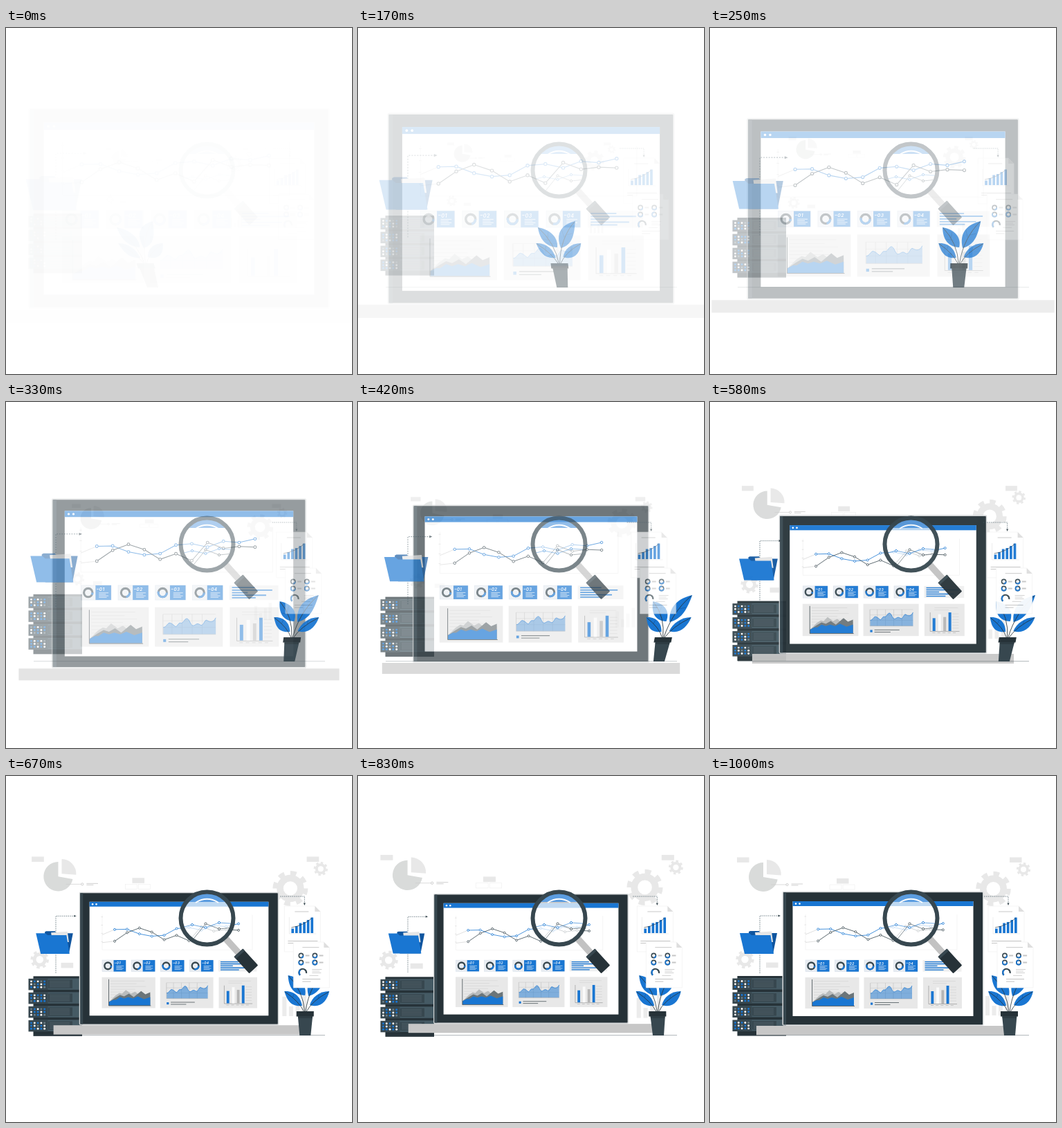
These frames come from a looping animation (500x500 px, 1040 ms). An HTML page:

```html
<!DOCTYPE html>
<html lang="en">
<head>
<meta charset="utf-8">
<title>Data analysis</title>
<style>
html, body { margin: 0; width: 100%; height: 100%; overflow: hidden; background: #fff; }
svg { display: block; width: 100vw; height: 100vh; }
text { font: italic 600 5px Inter, sans-serif; letter-spacing: .4px; }
</style>
</head>
<body>
<svg viewBox="0 0 500 500">
  <clipPath id="glass"><circle cx="290.5" cy="205.5" r="36"/></clipPath>
  <g id="back"></g><g id="server"></g><g id="laptop"></g><g id="floor"></g>
  <g id="folder"></g><g id="lens"></g><g id="plant"></g><g id="docs"></g>
</svg>
<script>
const BLUE = '#1976d2', DARK = '#263238', SLATE = '#37474f', PALE = '#e8e8e8';
const $ = id => document.getElementById(id);
const range = n => [...Array(n).keys()];
const each = (list, draw) => list.map(draw).join('');

const rect = (x, y, w, h, fill, more = '') =>
  `<rect x="${x}" y="${y}" width="${w}" height="${h}" fill="${fill}" ${more}/>`;
const fill = (d, color, more = '') => `<path d="${d}" fill="${color}" ${more}/>`;
const line = (d, color, w = 1, more = '') =>
  `<path d="${d}" fill="none" stroke="${color}" stroke-width="${w}" ${more}/>`;
const dot = (x, y, r, color) => `<circle cx="${x}" cy="${y}" r="${r}" fill="${color}"/>`;
const ring = (x, y, r, color, w, more = '') =>
  `<circle cx="${x}" cy="${y}" r="${r}" fill="none" stroke="${color}" stroke-width="${w}" ${more}/>`;
const rows = (x, y, widths, gap, color, w) =>
  each(widths, (len, i) => line(`M${x} ${y + i * gap}h${len}`, color, w));
const donut = (x, y, r, w, share) => ring(x, y, r, SLATE, w) +
  ring(x, y, r, BLUE, w, `pathLength="100" stroke-dasharray="${share} 100"`);
const gear = (x, y, out) =>
  ring(x, y, out * .59, PALE, out * .38) +
  ring(x, y, out * .87, PALE, out * .28, 'pathLength="16" stroke-dasharray="1 1"');
const series = (points, color) =>
  line('M' + points.join('L'), color, .8) +
  each(points, ([x, y]) => `<circle cx="${x}" cy="${y}" r="1.5" fill="#fff" stroke="${color}" stroke-width=".8"/>`);

function drawBack() {
  return fill('M77 146V125A21 21 0 1 0 97.7 149.6Z', '#d9dbda') +
    fill('M82 142V121A21 21 0 0 1 102.7 143.5Z', PALE) +
    line('M88 157H110', '#ccc', .7) + ring(111.5, 157, 1.6, '#bbb', .7) +
    rows(117.5, 156, [16.5, 10], 2, '#ccc', .9) +
    gear(409.5, 163, 25) + gear(453, 135, 10) + gear(50.5, 265, 13) +
    each([[39, 117.5], [433, 117.5], [183, 148], [81, 269.5]], ([x, y]) => rect(x, y, 17.5, 7.5, PALE)) +
    each([173, 192], x => rect(x, 157, 17, 7, 'none', 'stroke="#eee" stroke-width=".6"')) +
    each([28, 14, 24, 34], (h, i) => rect(398 + i * 9.5, 346 - h, 6, h, '#ececec'));
}

function drawServer() {
  return rect(39.5, 289, 70.5, 86.5, DARK) + each(range(4), u => {
    const y = 292 + u * 20;
    return rect(40, y, 70, 16.5, '#455a64') +
      rect(61, y + 2, 35, 12.5, SLATE) +
      each(range(5), i => line(`M63 ${y + 4 + i * 2.1}h29`, '#5d6e76', .6)) +
      rect(32.5, y + .5, 28, 16.5, SLATE) +
      each(range(15), i => {
        const col = i % 5, row = i / 5 | 0, k = (i * 7 + u * 5) % 11;
        return dot(36.5 + col * 4.8, y + 4.5 + row * 4.2, 1.45, k < 4 ? '#fff' : k < 9 ? BLUE : '#6b7d86');
      });
  });
}

function drawCharts() {
  const area = (d, color, more) => fill('M148 332V' + d + 'V332Z', color, more);
  const bars = [[319.4, 311, BLUE], [327.2, 305.5, '#fafafa'], [334.4, 309.4, '#b5b5b5'], [341.6, 303, BLUE]];
  return rect(137.5, 291, 78, 45, PALE) + rect(222.5, 291, 77.5, 45, PALE) + rect(308, 291, 56, 45, PALE) +
    rows(150, 296.5, [50, 38, 52, 36, 44, 28, 50, 54], 4, '#ccc', .5) +
    area('327L157 318L163 314L167 315L172.5 309.5L180 315L186 312L195 319L208 316', '#b9bcbd') +
    area('327L157 321L164 317L170 319L177 315L184 320L194.8 311L201 316L208 313', '#6b7579') +
    area('327L154 324L158 324L164 320L170 322L176 320L183 322L190 319L199 323L208 320', BLUE) +
    line('M147.6 294V332.5H209', DARK, .7) +
    each(range(3), i => line(`M232 ${299 + i * 7.5}H292`, '#c4c4c4', .5)) +
    each(range(4), i => line(`M${242 + i * 11.5} 299V322`, '#bbb', .5)) +
    fill('M232 322V314C236 314 237 308 240 309S244 312 246 313S249 308 252 309S256 304 259 304S263 312 266 312S270 308 274 311S279 304 282 306S289 309 292 303V322Z', BLUE, 'opacity=".5"') +
    line('M232 314C236 314 237 308 240 309S244 312 246 313S249 308 252 309S256 304 259 304S263 312 266 312S270 308 274 311S279 304 282 306S289 309 292 303', BLUE, .7) +
    line('M231.7 299V322H292', '#999', .4) +
    rect(232, 327.5, 3.2, 3.2, BLUE) + rows(238, 327.5, [35, 22.5], 3, '#5a6468', .9) +
    rows(322, 296.5, [33, 20], 3, '#d2d2d2', .6) +
    each(range(6), i => line(`M347 ${305 + i * 4}h9`, '#c8c8c8', .5)) +
    line('M316 303V329.5H357', '#777', .5) +
    each(bars, ([x, y, color]) => rect(x, y, 3.9, 329 - y, color)) +
    each(range(5), i => line(`M${319 + i * 7.2} 331.5h4`, '#aaa', .6));
}

function drawLaptop() {
  const x = i => +(156.2 + i * 18.06).toFixed(1);
  const blue = [221.4, 221, 227.8, 231.2, 229.8, 220, 218.5, 222.4, 215.7, 217.1, 213];
  const dark = [238.4, 226, 219.2, 225.2, 236.3, 229.9, 237.8, 217.1, 223.8, 221.7, 222.4];
  const plot = (ys, color) => series(ys.map((y, i) => [x(i), y]), color);
  const cards = each(range(4), i => {
    const cx = 138 + i * 42.5;
    return rect(cx, 266, 34.6, 16.7, '#e9edf2', 'stroke="#d0dae6" stroke-width=".5"') +
      donut(cx + 8.3, 274.4, 4.9, 2.4, [8, 22, 55, 30][i]) +
      rect(cx + 16.7, 266, 17.8, 16.7, BLUE) +
      line(`M${cx + 18} 270.3h2.6`, '#fff', .6) +
      `<text x="${cx + 21}" y="272.5" fill="#fff">0${i + 1}</text>` +
      rows(cx + 20.5, 274.6, [11, 8, 11, 9], 1.7, '#d8e7f7', .7);
  });
  return rect(105.2, 167.5, 289.6, 192.5, DARK, 'rx="1.5" stroke="#d5d8d9" stroke-width="1.5"') +
    rect(106, 168.3, 4, 191, SLATE) +
    rect(67, 361, 366, 13.5, '#c7c7c7') +
    rect(119.5, 181, 261, 166, '#fff') + rect(119.5, 181, 261, 7, BLUE) +
    dot(124, 184.6, 1.3, '#fff') + dot(129.5, 184.6, 1.3, '#fff') +
    line('M138 200V251H357V200', '#eee', .6) +
    each(range(4), i => line(`M136.5 ${203 + i * 12}h2.5`, '#ccc', .5)) +
    line('M138 229L156.2 221.4M138 240.5L156.2 238.4', '#ccc', .6) +
    plot(blue, BLUE) + plot(dark, SLATE) + cards +
    rect(307.5, 266, 56, 16.7, '#f0f0f0') +
    rows(310.5, 268.6, [26, 46, 18, 39, 27], 2.9, BLUE, 1.4) +
    drawCharts();
}

function drawFolder() {
  return line('M72 285V202H99', '#455a64', .8, 'stroke-dasharray="1.4 1.4"') +
    fill('M98.5 200.5L102 202L98.5 203.5Z', SLATE) +
    fill('M56 229V225L58 224H71L73 227H97L91 257H60Z', '#0f559f') +
    fill('M65 226L89 224.5L91 240H67Z', '#e6e6e6') +
    fill('M43 227H56.5L60 230H87.5L92 257H50Z', BLUE);
}

function drawLens() {
  return '<circle cx="290.5" cy="205.5" r="37" fill="#fff" opacity=".72"/>' +
    '<g clip-path="url(#glass)">' +
    fill('M254 182V166H327V182Z', '#5c9de0') + fill('M254 166H327V174Q290 166 254 174Z', '#8b9499') +
    line('M274 183Q290.5 172.5 307 183', '#fff', 1.8) +
    line('M240 222.5L269 215L288.5 219L308 212L338 214', BLUE, .8, 'opacity=".75"') +
    line('M246 230L268 239L288.5 213.5L308 221L338 218', SLATE, .8, 'opacity=".75"') + '</g>' +
    each([[269, 215, BLUE], [288.5, 219, BLUE], [308, 212, BLUE], [288.5, 213.5, SLATE], [308, 221, SLATE]],
      ([x, y, color]) => `<circle cx="${x}" cy="${y}" r="1.6" fill="#fff" stroke="${color}" stroke-width=".8"/>`) +
    '<g transform="translate(290.5 205.5) rotate(47.7)">' +
    rect(39, -4.8, 30, 9.6, '#c2c2c2') + rect(67.5, -8.7, 32.5, 17.4, DARK, 'rx="1"') +
    rect(67.5, -8.7, 4, 17.4, SLATE) + '</g>' +
    ring(290.5, 205.5, 38, SLATE, 6);
}

function drawPlant() {
  const leaves = [
    'M462 279C438 285 432 300 437 318C455 314 459 296 462 279Z',
    'M407 288C424 291 435 302 432 317C415 316 408 305 407 288Z',
    'M402 311C417 310 426 320 428 332C412 334 406 324 402 311Z',
    'M467 311C452 311 442 320 439 331C455 336 464 325 467 311Z'];
  return each(leaves, d => fill(d, BLUE)) +
    line('M461 280C446 295 436 316 433 341M408 289Q429 310 432 341M403 312Q424 326 431 341M466 312Q442 325 434 341', DARK, .8) +
    line('M447 299L456 297M444 304L441 292M420 303L421 295M423 307L413 305M414 321L416 315M451 322L452 316', '#0f559f', .6) +
    fill('M422 346H443.5L441 375H425Z', SLATE) + rect(420, 340, 25, 7.5, DARK) +
    line('M422.5 349H443', DARK, 1);
}

function drawDocs() {
  const sheet = (x, y) =>
    fill(`M${x} ${y}h44l8 8v58h-52Z`, '#fff', 'stroke="#eee" stroke-width=".6"') +
    fill(`M${x + 44} ${y}v8h8Z`, '#dedede');
  return line('M396 174H431V184', '#455a64', .8, 'stroke-dasharray="1.4 1.4"') +
    fill('M429.5 183.5H432.5L431 187Z', SLATE) +
    sheet(402, 188) + line('M417 196H437', '#ccc', 1.1) + line('M409 204V228H448', '#ddd', .5) +
    each([6.5, 10, 14.5, 16, 19, 22.5], (h, i) => rect(412 + i * 5.6, 227 - h, 3.7, h, BLUE)) +
    line('M412 219Q430 216 442 205', DARK, .6) +
    rows(407, 238.5, [43, 8], 3, '#c4c4c4', 1) +
    sheet(415, 240) + line('M428 247.7H452', '#c8c8c8', 1) +
    each(range(4), i => {
      const x = 426 + i % 2 * 20, y = 259.5 + (i >> 1) * 10;
      return donut(x, y, 3.1, 1.6, 25 + i * 18) + rect(x + 6.3, y - 1, 5.8, 2, '#c6c6c6');
    }) +
    line('M424.6 287.8A5.3 5.3 0 1 1 433.6 285', SLATE, 2.2) + line('M424.6 287.8A5.3 5.3 0 0 1 425 280.2', BLUE, 2.2) +
    rows(442, 279.5, [14, 11, 13], 2.5, '#c4c4c4', .8) + rows(438, 288.3, [13], 1, '#c4c4c4', .8) +
    rows(428, 293.5, [26, 12], 3.5, '#bbb', .9);
}

const parts = { back: drawBack, server: drawServer, laptop: drawLaptop, folder: drawFolder,
  lens: drawLens, plant: drawPlant, docs: drawDocs,
  floor: () => line('M40 374.6H461', SLATE, .4) };
for (const id in parts) $(id).innerHTML = parts[id]();

// cubic-bezier(.36, -.01, .5, 1.38): overshoots, then settles
function ease(x) {
  if (x >= 1) return 1;
  const curve = (s, a, b) => 3 * (1 - s) ** 2 * s * a + 3 * (1 - s) * s * s * b + s ** 3;
  let lo = 0, hi = 1;
  for (let i = 0; i < 30; i++) {
    const mid = (lo + hi) / 2;
    curve(mid, .36, .5) < x ? lo = mid : hi = mid;
  }
  return curve(lo, -.01, 1.38);
}

const zoom = (x, y, s) => `translate(${x} ${y}) scale(${s}) translate(${-x} ${-y})`;
function place(id, transform, opacity) {
  $(id).setAttribute('transform', transform);
  $(id).setAttribute('opacity', Math.min(1, opacity + .01));
}

// Skew swings 17, -10, 2, 0 degrees while the slide ends at 60 %
function plantPose(t) {
  if (t < .6) {
    const p = ease(t / .6);
    return [-238 * (1 - p), 17 - 27 * p, p];
  }
  if (t < .8) return [0, -10 + 12 * ease((t - .6) / .2), 1];
  return [0, 2 - 2 * ease((t - .8) / .2), 1];
}

function render(ms) {
  const step = Math.min(24, Math.floor((ms + 4) * .024));
  const t = Math.min(1, (step + .85) / 24), p = ease(t);
  const shrink = 1.5 - .5 * p, slide = -21 * (1 - p);
  place('back', zoom(250, 230, .5 + .5 * p), p);
  place('server', `translate(0 ${slide})`, p);
  place('laptop', zoom(250, 270, shrink), p);
  place('floor', '', p);
  place('folder', zoom(72, 244, shrink), p);
  place('lens', '', p);
  place('docs', `translate(${slide} 0)`, p);
  const [x, skew, alpha] = plantPose(t);
  place('plant', `translate(${x + 433} 327) skewX(${skew}) translate(-433 -327)`, alpha);
}

const start = performance.now();
function loop() {
  render((performance.now() - start) % 1040);
  requestAnimationFrame(loop);
}
loop();
</script>
</body>
</html>
```
